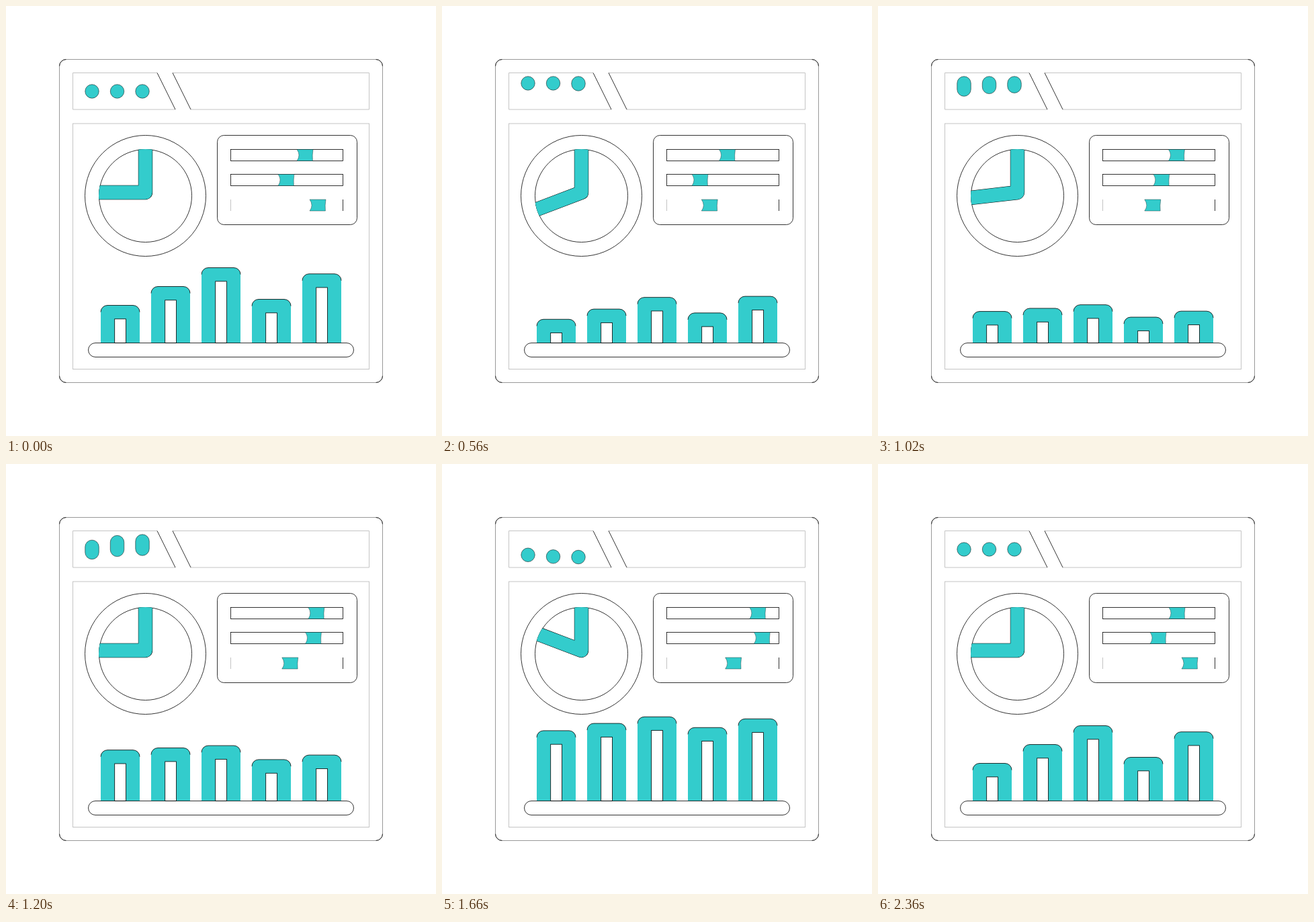
Animation, 640 px wide and 640 px high, one loop 2.42 s. Source, as an HTML page:

```html
<!DOCTYPE html>
<html lang="en">
<head>
<meta charset="utf-8">
<title>Dashboard</title>
<style>
  html, body { margin: 0; width: 100%; height: 100%; overflow: hidden; background: #fff; }
  svg { display: block; width: 100vw; height: 100vh; }
  .line { fill: none; stroke: #000; stroke-width: .8; }
  .soft { fill: none; stroke: #999; stroke-width: 1; }
  .pale { fill: none; stroke: #c4c4c4; stroke-width: 1; }
  .teal { fill: #33cccc; }
</style>
</head>
<body>
<svg id="stage" viewBox="0 0 640 640">
  <defs>
    <clipPath id="face"><circle cx="207.5" cy="282.5" r="69.5"/></clipPath>
  </defs>
  <rect class="soft" x="79.5" y="79.5" width="481" height="481" rx="10"/>
  <path class="line" d="M79.5 89.5a10 10 0 0 1 10-10M550.5 79.5a10 10 0 0 1 10 10M560.5 550.5a10 10 0 0 1-10 10M89.5 560.5a10 10 0 0 1-10-10"/>
  <path class="pale" d="M225 99.5H99.5V154H252M248 99.5H540.5V154H275"/>
  <path class="line" d="M225 99.5L252 154M248 99.5L275 154"/>
  <rect class="pale" x="99.5" y="175" width="441" height="365.5"/>
  <g id="dots"></g>
  <circle class="line" cx="207.5" cy="282.5" r="90"/>
  <circle class="line" cx="207.5" cy="282.5" r="69"/>
  <g clip-path="url(#face)" fill="none" stroke-linejoin="round">
    <path class="hand" stroke="#000" stroke-width="21.4"/>
    <path class="hand" stroke="#33cccc" stroke-width="20.4"/>
  </g>
  <rect class="line" x="314.5" y="192.5" width="208" height="133" rx="10"/>
  <rect class="line" x="334.5" y="213.5" width="167" height="17"/>
  <rect class="line" x="334.5" y="250.5" width="167" height="17"/>
  <path class="pale" d="M334.5 288V305"/>
  <path class="line" d="M501.5 288V305"/>
  <g id="knobs"></g>
  <g id="bars"></g>
  <rect class="line" x="122.5" y="501.5" width="395" height="21" rx="10.5"/>
</svg>
<script>
const LOOP = 2420, STEP = 20, LAST = 2360, FLOOR = 501.5;

// Height of each bar's top edge at rest, low and high
const BARS = [
  [445.5, 471.5, 392.5], [417.5, 462.5, 384.5], [389.5, 453.5, 376],
  [436.5, 468.8, 392], [398.7, 457.5, 379.3]
];
// Knob track y, stops and start of each move
const KNOBS = [
  { y: 213.5, stops: [433, 412.5, 458.5], starts: [0, 700, 1600] },
  { y: 250.5, stops: [405, 372, 465], starts: [40, 712, 1620] },
  { y: 288, stops: [452, 386, 421.5], starts: [60, 760, 1635] }
];
const KNOB_TIMES = [520, 700, 600];
const DOTS = [
  { x: 128, drop: 640, trail: 1006, back: 1510 },
  { x: 165.5, drop: 738, trail: 1120, back: 1580 },
  { x: 203, drop: 773, trail: 1180, back: 1610 }
];
const SWING = [[0, 0], [700, 23], [1200, 0], [1830, -25], [LAST, 0]];

const ease = (t, start, length) => {
  const x = Math.min(1, Math.max(0, (t - start) / length));
  return (1 - Math.cos(Math.PI * x)) / 2;
};
const follow = (t, keys) => keys.slice(1).reduce(
  (v, [time, value], i) =>
    v + (value - keys[i][1]) * ease(t, keys[i][0], time - keys[i][0]),
  keys[0][1]);

const make = (parent, tag, attrs) => {
  const node = document.createElementNS('http://www.w3.org/2000/svg', tag);
  for (const name in attrs) node.setAttribute(name, attrs[name]);
  return parent.appendChild(node);
};
const byId = id => document.getElementById(id);

const dots = DOTS.map(d => make(byId('dots'), 'rect', {
  class: 'teal', stroke: '#000', 'stroke-width': .5, x: d.x - 10.25, width: 20.5, rx: 10.25
}));
const knobs = KNOBS.map(k => make(byId('knobs'), 'path', {
  class: 'teal', stroke: '#000', 'stroke-width': .35,
  d: 'M0 0H24Q22.6 8.5 23.4 17H0Q6 8.5 0 0Z'
}));
const bars = BARS.map(() => ({
  body: make(byId('bars'), 'path', { class: 'teal' }),
  edge: make(byId('bars'), 'path', { class: 'line' }),
  hole: make(byId('bars'), 'rect', { fill: '#fff', stroke: '#000', 'stroke-width': .8 })
}));
const hands = document.querySelectorAll('.hand');

function drawDots(t) {
  DOTS.forEach((d, i) => {
    const back = 12 * ease(t, d.back, 400);
    const top = 127 - 12 * ease(t, 75 * i, 240) + 24 * ease(t, d.trail, 480) - back;
    const low = 127 - 12 * ease(t, 190 + 80 * i, 260) + 24 * ease(t, d.drop, 900) - back;
    dots[i].setAttribute('y', Math.min(top, low) - 10.25);
    dots[i].setAttribute('height', Math.abs(low - top) + 20.5);
  });
}

function drawHands(t) {
  const a = follow(t, SWING) * Math.PI / 180;
  const x = 207.5 - 100 * Math.cos(a), y = 277.5 + 100 * Math.sin(a);
  hands.forEach(h => h.setAttribute('d', `M207.5 180V277.5L${x} ${y}`));
}

function drawKnobs(t) {
  KNOBS.forEach(({ y, stops, starts }, i) => {
    const x = starts.reduce((v, start, n) =>
      v + (stops[(n + 1) % 3] - stops[n]) * ease(t, start, KNOB_TIMES[n]), stops[0]);
    knobs[i].setAttribute('transform', `translate(${x} ${y})`);
  });
}

function drawBars(t) {
  BARS.forEach(([rest, low, high], i) => {
    const top = follow(t - 32 * i, [[0, rest], [795, low], [1530, high], [2230, rest]]);
    const x = 141 + 75 * i;
    const cap = `M${x} ${top + 10}a10 10 0 0 1 10-10h38a10 10 0 0 1 10 10`;
    const { body, edge, hole } = bars[i];
    body.setAttribute('d', `${cap}V${FLOOR}H${x}Z`);
    edge.setAttribute('d', cap);
    hole.setAttribute('x', x + 20.7);
    hole.setAttribute('width', 16.8);
    hole.setAttribute('y', top + 20.3);
    hole.setAttribute('height', Math.max(0, FLOOR - top - 20.3));
  });
}

function draw(now) {
  const t = Math.min(LAST, Math.floor((now % LOOP) / STEP) * STEP);
  drawDots(t);
  drawHands(t);
  drawKnobs(t);
  drawBars(t);
}

let begin = null;
function tick(now) {
  if (begin === null) begin = now;
  draw(Math.max(0, now - begin));
  requestAnimationFrame(tick);
}
draw(0);
requestAnimationFrame(tick);
</script>
</body>
</html>
```
